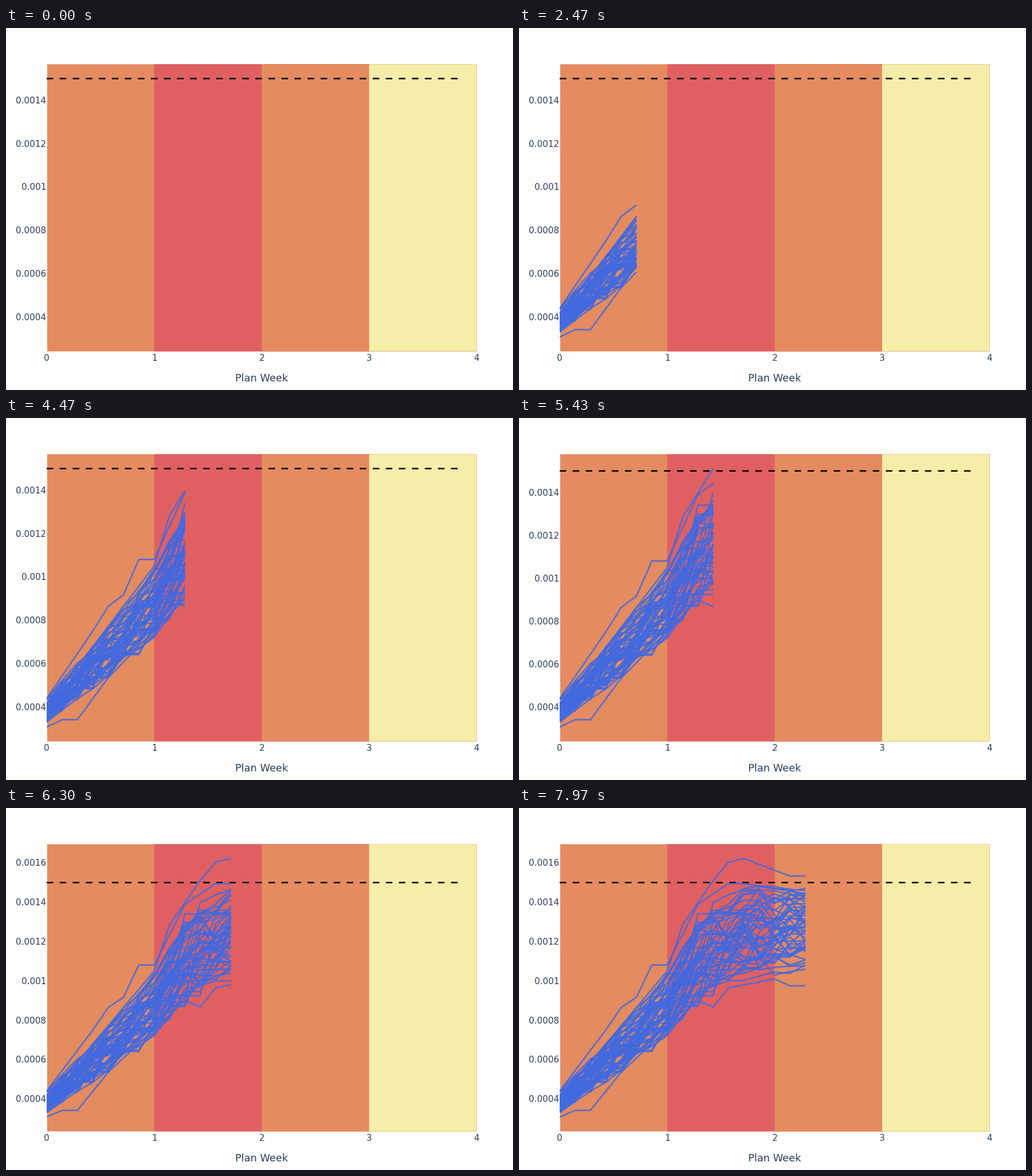
A matplotlib script for the animation above (8 s loop, 885x633 px).

```python
import numpy as np
import matplotlib.pyplot as plt
from matplotlib.animation import FuncAnimation
from matplotlib.collections import LineCollection

W, H, DPI = 885, 633, 100
LEFT, RIGHT, TOP, BOTTOM = 71, 821.5, 63.3, 565.5
PX = 72 / DPI               # points per pixel
STROKE = 2.53 * PX
INTERVAL, FRAMES = 50, 160
STEP_MS, LEAD_MS = 500, 50  # one more day every STEP_MS
LIMIT = 1.5                 # values are in thousandths
RUNS = 54
INK = "#2a3f5f"
ORANGE, RED, YELLOW = "#e48b60", "#e06062", "#f6eda9"

days = np.arange(17)


def path(*points):
    """Daily values of a polyline through (day, value) points."""
    return np.interp(days, *zip(*points))


def make_runs():
    """Mean-reverting random walks inside a rising band, with plateaus."""
    rng = np.random.default_rng(12)
    low = path((0, .32), (7, .69), (9, .86), (12, .96), (16, 1.04))
    high = path((0, .45), (7, 1.05), (9, 1.37), (12, 1.51), (16, 1.5))
    z = rng.normal(size=RUNS)
    runs = np.empty((RUNS, days.size))
    for d in days:
        runs[:, d] = (low[d] + high[d] + (high[d] - low[d]) * np.tanh(.62 * z)) / 2
        if d:
            hold = (rng.random(RUNS) < .15) & (runs[:, d - 1] > low[d])
            runs[hold, d] = runs[hold, d - 1]
        z = .86 * z + .51 * rng.normal(size=RUNS)
    # the highest, second highest and lowest runs
    runs[0] = path((0, .4), (7, 1.05), (8, 1.284), (10, 1.511), (11, 1.604),
                   (12, 1.622), (15, 1.533), (16, 1.533))
    runs[1] = path((0, .44), (3, .75), (4, .864), (5, .917), (6, 1.081),
                   (7, 1.081), (9, 1.389), (11, 1.495), (12, 1.495), (16, 1.443))
    runs[2] = path((0, .308), (1, .342), (2, .342), (4, .535), (9, .9),
                   (10, .868), (11, .965), (14, 1.01), (15, .975))
    return runs


runs = make_runs()

fig = plt.figure(figsize=(W / DPI, H / DPI), dpi=DPI, facecolor="#fdfdfc")
ax = fig.add_axes([LEFT / W, 1 - BOTTOM / H,
                   (RIGHT - LEFT) / W, (BOTTOM - TOP) / H])
ax.set_xlim(0, 4)
ax.axis("off")


def label(x, y, text, size, ha="center"):
    return fig.text(x / W, 1 - y / H, text, fontsize=size * PX, ha=ha,
                    va="baseline", color=INK, family="DejaVu Sans")


# each band runs to the right edge, so the next one covers it without a seam
for week, color in enumerate([ORANGE, RED, ORANGE, YELLOW]):
    ax.axvspan(max(week, .005), 4, color=color, lw=0, snap=False,
               clip_on=False, zorder=1)
for week in range(5):
    label(LEFT + week * (RIGHT - LEFT) / 4, 582.5, str(week), 15.2)
label(446.5, 617.5, "Plan Week", 17.7)

ax.plot([0, 27 / 7], [LIMIT, LIMIT], color="black", lw=STROKE,
        ls=(0, (4.5, 4.5)), dash_capstyle="butt", snap=False, zorder=2)
bundle = LineCollection([], colors="#4169e1", linewidths=STROKE, alpha=.87,
                        capstyle="butt", joinstyle="round", zorder=3)
ax.add_collection(bundle, autolim=False)
ticks = {v: label(70, 0, f"{v / 1000:g}", 15.2, "right")
         for v in np.arange(2, 9) / 5}


def draw(i):
    count = (i * INTERVAL + LEAD_MS) // STEP_MS + 1
    shown = runs[:, :count]
    bundle.set_segments([np.column_stack([days[:count] / 7, r]) for r in shown])
    low, high = runs[:, 0].min(), max(LIMIT, shown.max())
    pad = (high - low) / 18
    low, high = low - pad, high + pad
    ax.set_ylim(low, high)
    for v, text in ticks.items():
        y = BOTTOM - (v - low) / (high - low) * (BOTTOM - TOP)
        text.set_y(1 - (y + 5.5) / H)
        text.set_visible(v < high)
    return [bundle, *ticks.values()]


anim = FuncAnimation(fig, draw, frames=FRAMES, interval=INTERVAL,
                     init_func=lambda: draw(0), repeat=True, repeat_delay=0,
                     blit=False)
plt.show()
```
